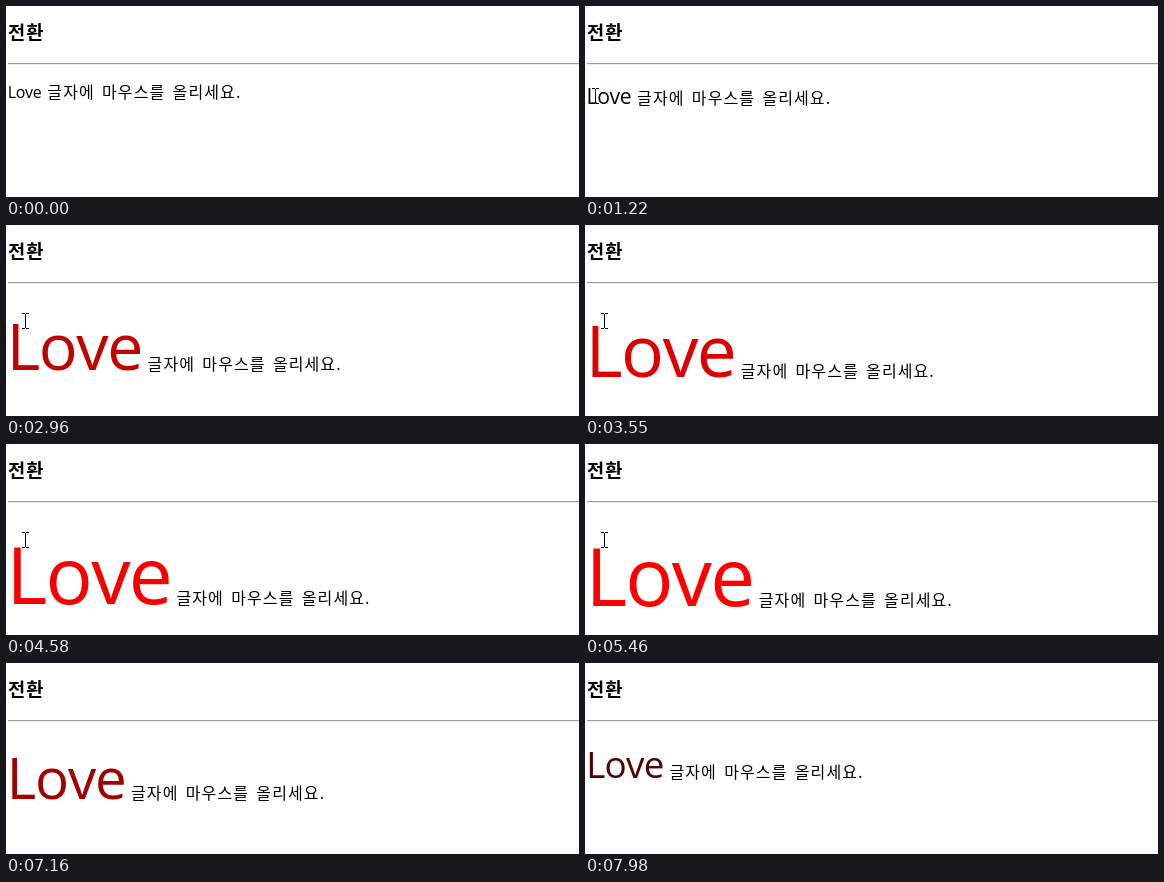
Recreate the animation shown at these times as an HTML page. Size 573x191 px, loop 8000 ms.

```html
<!DOCTYPE html>
<html lang="ko">
<head>
<meta charset="utf-8">
<title>전환</title>
<style>
  html, body { margin: 0; width: 100%; height: 100%; overflow: hidden; background: #fff; }
  svg { display: block; width: 573px; height: 191px; }
  text { font-family: "Noto Sans CJK KR", "Noto Sans CJK", sans-serif; white-space: pre; }
  #title { font-size: 18.72px; font-weight: 700; letter-spacing: 1px; }
  #rest { font-size: 16px; letter-spacing: 1.1px; word-spacing: 1.7px; }
  #love { font-family: "Open Sans", "Noto Sans", sans-serif; font-kerning: none; letter-spacing: -.021em; }
</style>
</head>
<body>
<svg viewBox="0 0 573 191">
  <text id="title" x="2" y="33">전환</text>
  <path d="M2 57H573V58H2Z" fill="#9a9a9a"/>
  <path d="M2 58H573V59H2Z" fill="#eee"/>
  <text id="love">Love</text>
  <text id="rest">글자에 마우스를 올리세요.</text>
  <path id="cursor" d="M-3 -7.5H0M1 -7.5H4M.5 -7V7M-3 7.5H0M1 7.5H4" stroke="#000" fill="none" shape-rendering="crispEdges"/>
</svg>
<script>
const LOOP = 8000, FIRST = 670, STEP = 67.7;
const [love, rest, cursor] = ['love', 'rest', 'cursor'].map(id => document.getElementById(id));
const clamp = v => Math.min(1, Math.max(0, v));

// CSS "ease": cubic-bezier(.25, .1, .25, 1)
function ease(x) {
  if (x <= 0 || x >= 1) return clamp(x);
  let lo = 0, hi = 1, u = .5;
  for (let i = 0; i < 24; i++) {
    u = (lo + hi) / 2;
    if (.75 * u * (1 - u) + u ** 3 < x) lo = u; else hi = u;
  }
  return .3 * u * (1 - u) ** 2 + 3 * u * u * (1 - u) + u ** 3;
}

// Pointer path: time, x, y
const path = [
  [670, 2, 88], [780, 6, 89], [1220, 10, 90], [1420, 12, 91],
  [2100, 19, 96], [5640, 19, 96], [6010, 3, 98], [6150, -6, 98]
];

function pointer(t) {
  const i = path.findIndex(p => p[0] > t);
  if (i < 1) return null;
  const [a, b] = [path[i - 1], path[i]];
  const k = (t - a[0]) / (b[0] - a[0]);
  return [1, 2].map(n => Math.round(a[n] + (b[n] - a[n]) * k));
}

function draw(time) {
  // The screen is refreshed in coarse steps
  const t = time < FIRST ? 0 : FIRST + Math.floor((time - FIRST) / STEP + .3) * STEP;
  const p = t < 6010 ? ease((t - 775) / 4800) : 1 - ease((t - 6010) / 5000);
  const size = 16 + 64 * p;
  const base = (92 + 1.088 * (size - 16)).toFixed(2);

  love.setAttribute('x', (2 - .02 * size).toFixed(2));
  love.setAttribute('y', base);
  love.style.fontSize = size.toFixed(2) + 'px';
  love.setAttribute('fill', `rgb(${Math.round(255 * p)},0,0)`);
  rest.setAttribute('x', (8.2 + 2.07 * size).toFixed(2));
  rest.setAttribute('y', base);

  const pos = pointer(t);
  cursor.style.display = pos ? '' : 'none';
  if (pos) cursor.setAttribute('transform', `translate(${pos})`);
}

const start = performance.now();
function tick() {
  draw((performance.now() - start) % LOOP);
  requestAnimationFrame(tick);
}
tick();
</script>
</body>
</html>
```
